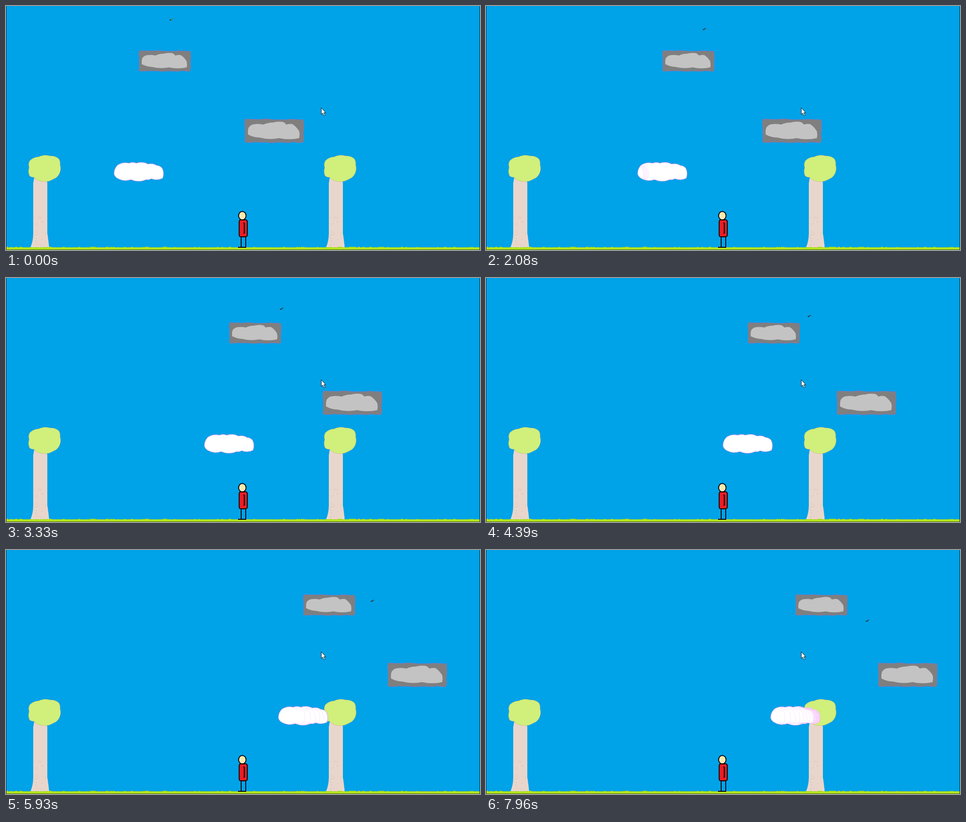
Write an HTML page with a canvas that moves like this. It is 1044 px wide and 537 px high and loops after 8000 ms.

```html
<!DOCTYPE html>
<html lang="en">
<head>
<meta charset="utf-8">
<title>Drifting platforms</title>
<style>
  html, body { margin: 0; width: 100%; height: 100%; overflow: hidden; background: #00a2e8; }
  canvas { display: block; }
</style>
</head>
<body>
<canvas id="stage" width="1044" height="537"></canvas>
<script>
const WIDTH = 1044, HEIGHT = 537;
const LOOP = 8000, STEP = 70, LAG = 30;
const ctx = document.getElementById('stage').getContext('2d');

const CLOUD = lumpy([
  [1, 27], [9, 7], [34, 3], [50, 3], [76, 5], [95, 8],
  [107, 14], [108, 36], [83, 37], [72, 39], [38, 39], [10, 37]
], 0.11);
const STONE = lumpy([
  [7, 30], [8, 17], [15, 11], [37, 11], [55, 7], [75, 6],
  [81, 11], [93, 10], [106, 24], [106, 37], [67, 37], [29, 36]
], 0.06);
const LEAVES = lumpy([
  [52, 341], [72, 332], [97, 330], [116, 336], [119, 349], [117, 370],
  [104, 381], [79, 386], [62, 377], [52, 374], [51, 356]
], 0.1);
const SLAB = roughBox(115, 46, 9);
const TRUNK = new Path2D('M62 378H89L91 390V500Q93 512 95 531H54Q60 517 60 500V390Z');
const CURSOR = new Path2D('M0 0V14.5L3.2 11.7L5.8 17.6L8.3 16.5L5.7 10.8H9.7Z');
const BIRD = new Path2D('M-3.5 1.2L-1 1.5L1 0L3.5 -2L0 -1.2Z');

function seeded(seed) {
  return () => (seed = (seed * 16807) % 2147483647) / 2147483647;
}

// Closed clockwise outline whose sides bulge outwards
function lumpy(points, bulge) {
  const path = new Path2D();
  path.moveTo(...points[0]);
  points.forEach(([x0, y0], i) => {
    const [x1, y1] = points[(i + 1) % points.length];
    const dx = x1 - x0, dy = y1 - y0;
    path.quadraticCurveTo(
      (x0 + x1) / 2 + 2 * bulge * dy,
      (y0 + y1) / 2 - 2 * bulge * dx,
      x1, y1
    );
  });
  path.closePath();
  return path;
}

// Rectangle with slightly uneven sides
function roughBox(w, h, gap) {
  const path = new Path2D(), random = seeded(19);
  const inset = () => random() * 1.6;
  const walk = (length, place) => {
    for (let d = 2; d < length - 1; d += gap) path.lineTo(...place(d));
  };
  walk(w, d => [d, inset()]);
  walk(h, d => [w - inset(), d]);
  walk(w, d => [w - d, h - inset()]);
  walk(h, d => [inset(), h - d]);
  path.closePath();
  return path;
}

function paint(c, path, fill, stroke, width = 1) {
  if (fill) { c.fillStyle = fill; c.fill(path); }
  if (stroke) { c.strokeStyle = stroke; c.lineWidth = width; c.stroke(path); }
}

function at(c, x, y, draw, scale = 1) {
  c.save();
  c.translate(x, y);
  c.scale(scale, scale);
  draw();
  c.restore();
}

// Eases in and out, then swings gently back
function drift(t) {
  const d = t / 1000 - 3.33;
  return 198.5 + 218 * Math.tanh(d / 2.5) - 0.8 * d * d;
}

const stepTime = k => Math.max(0, k * STEP - LAG);

function drawTree(c, x) {
  at(c, x, 0, () => {
    paint(c, TRUNK, '#e8d6cc');
    const random = seeded(77);
    c.fillStyle = '#d79a98';
    for (let i = 0; i < 30; i++) {
      c.fillRect(Math.round(64 + random() * 22), Math.round(456 + random() * 70), 1, 1);
    }
    paint(c, LEAVES, '#d1ef7b', '#c7b27a', 0.6);
  });
}

function drawGround(c) {
  const random = seeded(31);
  c.fillStyle = '#b5e61d';
  c.fillRect(0, 531, WIDTH, 6);
  for (let x = 0; x < WIDTH; x += 5) {
    c.fillStyle = random() < 0.1 ? '#d5c43c' : '#a5e01c';
    c.fillRect(x, random() < 0.25 ? 530 : 531, 2 + Math.floor(random() * 5), 2);
  }
  c.fillStyle = '#3c5a1c';
  c.fillRect(0, 536, WIDTH, 1);
}

function drawPerson(c) {
  c.fillStyle = '#000';
  for (const x of [517, 527]) c.fillRect(x, 507, 2, 24);
  for (const x of [511, 520]) c.fillRect(x, 530, 9, 2);
  const body = new Path2D();
  body.roundRect(513.5, 470.5, 18, 37.5, 4);
  paint(c, body, '#ed1c24', '#000', 2);
  paint(c, new Path2D('M523.5 477L525 479V499.5L524 501'), null, '#000', 2.5);
  const head = new Path2D();
  head.ellipse(520.5, 461.5, 8.2, 9.3, 0, 0, Math.PI * 2);
  paint(c, head, '#f7e9b3', '#000', 2);
}

function makeScenery() {
  const layer = document.createElement('canvas');
  layer.width = WIDTH;
  layer.height = HEIGHT;
  const c = layer.getContext('2d');
  c.fillStyle = '#00a2e8';
  c.fillRect(0, 0, WIDTH, HEIGHT);
  drawTree(c, 0);
  drawTree(c, 651);
  drawGround(c);
  drawPerson(c);
  c.fillStyle = '#0b2a3c';
  for (const x of [0, WIDTH - 1]) c.fillRect(x, 0, 1, HEIGHT);
  return layer;
}

function drawSlab(x, y, scale) {
  at(ctx, x, y, () => {
    paint(ctx, SLAB, '#7f7f7f', '#946fb5', 0.8);
    paint(ctx, STONE, '#c3c3c3');
  }, scale);
}

// Slow movement leaves faint pink rims inside the cloud
function drawRims(step, shift) {
  ctx.clip(CLOUD);
  for (let k = 0; k < step; k++) {
    const past = drift(stepTime(k));
    const late = past > 374;
    const sparse = past < 12 || (past > 300 && k % 3 === 0);
    if (!late && !sparse) continue;
    at(ctx, past - shift, 0, () => {
      ctx.beginPath();
      ctx.rect(78, 0, 40, 43);
      ctx.clip();
      paint(ctx, CLOUD, null, late ? '#f8cdfb' : '#fbe4fd');
    });
  }
}

function drawCloud(step, shift) {
  at(ctx, 237 + shift, 343, () => {
    paint(ctx, CLOUD, '#fff', '#d9a0ee');
    drawRims(step, shift);
  });
}

function drawBird(t, shift) {
  const s = t / 1000;
  const x = Math.round(364 + 1.223 * shift);
  const y = Math.round(29.5 + 8.44 * s + 0.936 * s * s);
  const tint = t < 700 ? '#b5d61d' : t < 1600 ? '#2c8a2c' : '#5a5148';
  at(ctx, x, y, () => {
    paint(ctx, BIRD, '#222a20', '#222a20', 0.7);
    paint(ctx, new Path2D('M-1 0L2.5 -1.5'), null, tint, 1.2);
  });
}

const scenery = makeScenery();

function render(time) {
  const step = Math.floor((time % LOOP + LAG) / STEP);
  const t = stepTime(step), shift = drift(t);
  ctx.drawImage(scenery, 0, 0);
  drawSlab(292 + Math.round(shift), 98, 1);
  drawSlab(525 + Math.round(shift * 0.868), 248.5, 1.14);
  drawCloud(step, Math.round(shift));
  drawBird(t, shift);
  at(ctx, 694.5, 224, () => paint(ctx, CURSOR, '#fff', '#111'));
}

let start;
function tick(now) {
  start ??= now;
  render(now - start);
  requestAnimationFrame(tick);
}
render(0);
requestAnimationFrame(tick);
</script>
</body>
</html>
```
